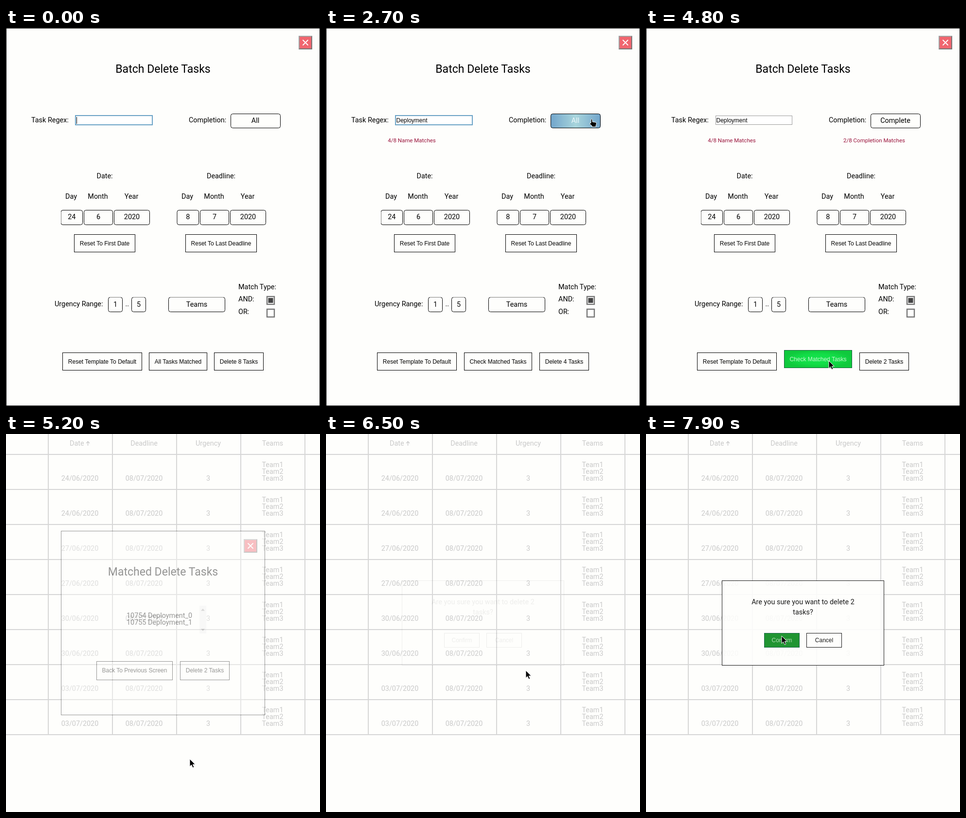
An HTML page that plays this animation: 646x777 px, repeating every 8 s.

```html
<!DOCTYPE html>
<html lang="en">
<head>
<meta charset="utf-8">
<title>Batch delete tasks</title>
<style>
  html, body { margin: 0; width: 100%; height: 100%; overflow: hidden; background: #fefefc; }
  svg { display: block; font: 14.4px Roboto, sans-serif; }
  .box, .btn rect { fill: #fefefc; stroke: #000; }
  .btn text, .field { font: 12px "Liberation Sans", Arial, sans-serif; }
  .mid { text-anchor: middle; }
  .title { font-size: 23.04px; }
  .note { font-size: 11.52px; fill: #99123a; }
  .grid { fill: #c9c9c9; }
  .grid path { fill: none; stroke: #d6d6d6; stroke-width: 2; }
  .hot rect { fill: url(#green); stroke: #17603c; }
  .hot text { fill: #c9f8d2; }
  .pressed rect { fill: #078a1c; stroke: #06563a; }
  .pressed text { fill: #a9d8ac; }
  .blue rect { fill: url(#blue); }
  .blue text, .pale { fill: #eef8fb; }
</style>
</head>
<body>
<svg id="stage" width="646" height="777" viewBox="0 0 646 777"></svg>
<script>
const LOOP = 8000;
const stage = document.getElementById('stage');

// Markup helpers
const text = (x, y, s, cls = '', id = '') => `<text x="${x}" y="${y}" class="${cls}" id="${id}">${s}</text>`;
const mid = (x, y, s, cls = '', id = '') => text(x, y, s, 'mid ' + cls, id);
const box = (l, r, y, h, rx = 4) =>
  `<rect class="box" x="${l + .5}" y="${y + .5}" width="${r - l - 1}" height="${h - 1}" rx="${rx}"/>`;
const picker = (l, r, y, s) => box(l, r, y, 31) + mid((l + r) / 2, y + 19, s);
const button = (l, r, y, h, s, id = '') =>
  `<g class="btn" id="${id}">${box(l, r, y, h, 0)}${mid((l + r) / 2, y + Math.round(h / 2) + 4, s)}</g>`;
const group = (id, body) => `<g id="${id}">${body}</g>`;
const closeButton = (x, y) => `<g transform="translate(${x} ${y})">
  <path d="M0 0H28V28H0z" fill="#767676"/><path d="M0 28V0H28L26 2H2V26z" fill="#a2a2a2"/>
  <path d="M2 2H26V26H2z" fill="#f0666f"/>
  <path d="M8.5 8.5L19.5 19.5M19.5 8.5L8.5 19.5" stroke="#fff" stroke-width="1.8"/></g>`;
const checkbox = (y, on) =>
  `<rect x="537" y="${y}" width="15" height="16" fill="#fefefc" stroke="#777" stroke-width="2.4"/>` +
  (on ? `<rect x="539.5" y="${y + 3}" width="10" height="10" fill="#444"/>` : '');

function datePart(dx, title, titleX, day, month) {
  return mid(titleX, 309, title) + mid(134 + dx, 351, 'Day') + mid(189 + dx, 351, 'Month') +
    mid(258 + dx, 351, 'Year') + picker(112.5 + dx, 158 + dx, 374, day) +
    picker(160 + dx, 220 + dx, 374, month) + picker(222 + dx, 296 + dx, 374, '2020');
}

function urgencyPart() {
  const faint = (l, r) => `<path d="M${l + 4} 553.5H${r - 4}" stroke="#fefefc" opacity=".5"/>`;
  const cells = [[210, 240, '1'], [258, 288, '5'], [334, 451, 'Teams']];
  return text(100, 572, 'Urgency Range:') + text(245.5, 572, '..') +
    cells.map(([l, r, s]) => picker(l, r, 553, s).replace('y="572"', 'y="573"') + faint(l, r)).join('');
}

function form() {
  return `<rect x=".5" y=".5" width="645" height="776" fill="#fefefc" stroke="#000"/>` +
    closeButton(602, 16) + mid(323, 92, 'Batch Delete Tasks', 'title') +
    text(52, 194, 'Task Regex:') +
    `<rect id="input" x="143" y="180" width="158" height="19" fill="#fff"/>` +
    text(144.5, 194, '', 'field', 'typed') +
    `<rect id="caret" y="183" width="1" height="14"/>` +
    mid(176.5, 235, '4/8 Name Matches', 'note', 'nameNote') +
    mid(469.5, 235, '2/8 Completion Matches', 'note', 'doneNote') +
    text(376, 194, 'Completion:') +
    group('status', box(462, 565, 176, 30) + mid(513, 195, 'All', '', 'statusText')) +
    `<g clip-path="url(#left)">${datePart(0, 'Date:', 203, '24', '6')}</g>` +
    datePart(239, 'Deadline:', 442.5, '8', '7') +
    button(140, 266, 424, 37, 'Reset To First Date') +
    button(369, 516, 424, 37, 'Reset To Last Deadline') +
    urgencyPart() +
    text(478, 537, 'Match Type:') + text(478, 562, 'AND:') + text(478, 588, 'OR:') +
    checkbox(552, true) + checkbox(578, false) +
    group('plainRow', button(116, 280, 667, 37, 'Reset Template To Default') +
      button(294, 414, 667, 37, 'All Tasks Matched') + button(428, 530, 667, 37, 'Delete 8 Tasks')) +
    group('matchRow', button(105, 269, 667, 37, 'Reset Template To Default') +
      button(284, 424, 667, 37, 'Check Matched Tasks', 'check') +
      button(439, 541, 667, 37, 'Delete 4 Tasks', 'deleteSome')) +
    group('menu', box(462, 565, 176, 118) +
      `<path d="M463 204V180q0-3 3-3H561q3 0 3 3V204z" fill="url(#dim)"/>
       <rect id="choice" x="463" y="204" width="101" height="30" fill="url(#blue)"/>
       <path d="M463 234.5H564" stroke="#444"/><path d="M463 263.5H564" stroke="#222" stroke-width="2"/>` +
      mid(513, 195, 'All', 'pale') + mid(513, 223, 'Complete', '', 'choiceText') +
      mid(513, 253, 'Incomplete') +
      `<text class="mid" x="513" y="283" style="font-family:'DejaVu Sans',sans-serif">✖</text>`);
}

function table() {
  const dates = ['24/06', '24/06', '27/06', '27/06', '30/06', '30/06', '03/07', '03/07'];
  let lines = '', out = '';
  for (let i = 0; i < 9; i++) lines += `M0 ${42 + 72 * i}H646`;
  for (let i = 0; i < 5; i++) lines += `M${87 + 132 * i} 0V618`;
  out += text(131, 24, 'Date') + mid(284, 24, 'Deadline') + mid(416, 24, 'Urgency') + mid(548.5, 24, 'Teams') +
    `<path d="M168.5 24V15.5M165 19L168.5 15.5L172 19" style="stroke:#c9c9c9;stroke-width:1.3"/>`;
  dates.forEach((d, i) => {
    const y = 96 + 72 * i;
    out += mid(152, y, d + '/2020') + mid(284, y, '08/07/2020') + mid(416, y, '3');
    for (let n = 1; n < 4; n++) out += mid(548.5, y - 42 + 14 * n, 'Team' + n);
  });
  return `<g class="grid"><path d="${lines}"/>${out}</g>`;
}

const matched = () => box(113, 533, 199, 379, 0) + closeButton(489, 216) +
  mid(323, 291, 'Matched Delete Tasks', 'title') +
  text(248, 378, '10754 Deployment_0') + text(248, 392, '10755 Deployment_1') +
  `<path d="M398 353H412V410H398z" fill="#f1f1f1"/>
   <path d="M401 363.5h8l-4-4.5zM401 400.5h8l-4 4.5z" fill="#a3a3a3"/>` +
  button(186, 343, 467, 39, 'Back To Previous Screen').replace('y="491"', 'y="490"') +
  button(358, 460, 467, 39, 'Delete 2 Tasks', 'deleteMatched').replace('y="491"', 'y="490"');

const confirmBox = () => box(156, 490, 301, 175, 0) +
  mid(323, 350, 'Are you sure you want to delete 2') + mid(323, 371, 'tasks?') +
  button(243, 316, 409, 30, 'Confirm', 'confirm') + button(330, 403, 409, 30, 'Cancel');

const stops = list => list.map(([o, c]) => `<stop offset="${o}" stop-color="${c}"/>`).join('');
stage.innerHTML = `<defs>
  <linearGradient id="blue">${stops([[0, '#72a5cb'], [.5, '#a8d5dc'], [1, '#72a5cb']])}</linearGradient>
  <linearGradient id="dim">${stops([[0, '#6f9fbd'], [.6, '#a3c3cc'], [1, '#83acbf']])}</linearGradient>
  <radialGradient id="green">${stops([[0, '#13e54d'], [.6, '#12dd47'], [1, '#10c93d']])}</radialGradient>
  <clipPath id="left"><path d="M113 290H330V420H113z"/></clipPath></defs>` +
  group('page', table() + group('matched', matched()) + group('ask', confirmBox())) +
  group('form', form()) +
  `<g id="cursor" stroke="#fff" stroke-linejoin="round">
    <path id="arrow" d="M0 0V15.5L3.6 12.2L6.2 18L8.9 16.8L6.4 11.2H11.2z"/>
    <path id="hand" d="M3 1.2q1.6-1.8 3 0v4.6l6.6 1.2q2.2.6 1.8 3.2l-1.2 3.3v2.7H5.2v-2L.4 10q-.4-2.2 2.6-1.6z"/></g>`;

const ui = {};
stage.querySelectorAll('[id]').forEach(e => { if (e.id) ui[e.id] = e; });
const show = (e, on) => { e.style.display = on ? '' : 'none'; };
const hot = (e, on, cls = 'hot') => e.classList.toggle(cls, on);

// Fades, driven by setting currentTime
const fade = (el, steps) => {
  const a = el.animate(steps.map(([t, opacity, easing = 'linear']) => ({ offset: t / LOOP, opacity, easing })),
    { duration: LOOP, fill: 'both' });
  a.pause();
  return a;
};
const fades = [
  fade(ui.matched, [[0, 0], [4950, 0, 'ease'], [5950, 1], [6390, 1], [6400, 0], [LOOP, 0]]),
  fade(ui.ask, [[0, 0], [6450, 0, 'ease'], [7100, 1], [7800, 1], [7900, .9], [LOOP, .8]])
];

const WORD = 'Deployment';
const typing = [[400, 1], [600, 2], [800, 3], [900, 4], [1100, 5], [1300, 7], [1500, 8], [1600, 9], [1800, 10]];
const path = [
  [2300, 574, 222], [2500, 560, 199], [2700, 542, 187], [3100, 541, 189], [3300, 534, 210], [3450, 534, 211],
  [3600, 576, 293], [3700, 576, 293], [4000, 594, 640], [4100, 594, 640], [4600, 382, 682], [4800, 376, 684],
  [5100, 376, 685], [5800, 393, 567], [6000, 398, 539], [6100, 398, 539], [6400, 411, 486], [7100, 411, 486],
  [7700, 280, 417], [7900, 279, 415], [LOOP, 279, 415]
];

function cursorAt(t) {
  const i = Math.max(1, path.findIndex(p => p[0] > t));
  const [t0, x0, y0] = path[i - 1], [t1, x1, y1] = path[i];
  const k = Math.max(0, (t - t0) / (t1 - t0));
  return [x0 + (x1 - x0) * k, y0 + (y1 - y0) * k];
}

function render(t) {
  const between = (a, b) => t >= a && t < b;
  const lift = (e, start) => {
    const k = Math.min(1, Math.max(0, (t - start) / 200));
    e.setAttribute('transform', `translate(0 ${-5 * k})`);
  };
  fades.forEach(a => { a.currentTime = t; });
  show(ui.form, t < 5000);
  show(ui.page, t >= 5000);

  // Regex field
  const count = typing.reduce((n, [at, c]) => t >= at ? c : n, 0);
  ui.typed.textContent = WORD.slice(0, count);
  const focus = t < 3000;
  ui.input.setAttribute('stroke', focus ? '#6ba3c6' : 'none');
  ui.input.setAttribute('stroke-width', 2);
  if (!focus) {
    ui.input.setAttribute('stroke', '#9c9c9c');
    ui.input.setAttribute('stroke-width', 1);
  }
  const half = focus ? 0 : .5;
  ui.input.setAttribute('x', 143 + half);
  ui.input.setAttribute('y', 180 + half);
  ui.input.setAttribute('width', 158 - 2 * half);
  ui.input.setAttribute('height', 19 - 2 * half);
  show(ui.caret, t < 2300 || between(2800, 3000));
  ui.caret.setAttribute('x', Math.round(144.8 + (count ? ui.typed.getComputedTextLength() : 0)));
  show(ui.nameNote, t >= 400);
  show(ui.plainRow, t < 400);
  show(ui.matchRow, t >= 400);

  // Completion menu
  const chosen = t >= 3500;
  show(ui.menu, between(3000, 3500));
  hot(ui.status, between(2500, 3000), 'blue');
  ui.statusText.textContent = chosen ? 'Complete' : 'All';
  show(ui.choice, t >= 3200);
  hot(ui.choiceText, t >= 3200, 'pale');
  show(ui.doneNote, chosen);
  ui.deleteSome.lastElementChild.textContent = chosen ? 'Delete 2 Tasks' : 'Delete 4 Tasks';

  // Buttons under the pointer
  hot(ui.check, t >= 4600);
  lift(ui.check, 4500);
  hot(ui.deleteMatched, t >= 6300);
  lift(ui.deleteMatched, 6200);
  hot(ui.confirm, t >= 7600);
  hot(ui.confirm, t >= 7800, 'pressed');

  const [x, y] = cursorAt(t);
  const hand = between(2500, 3600);
  show(ui.cursor, t >= 2300);
  show(ui.hand, hand);
  show(ui.arrow, !hand);
  ui.cursor.setAttribute('transform', `translate(${Math.round(x)} ${Math.round(y)})`);
}

const start = performance.now();
function tick() {
  const t = (performance.now() - start) % LOOP;
  render(Math.floor(t / 100) * 100);
  requestAnimationFrame(tick);
}
tick();
</script>
</body>
</html>
```
